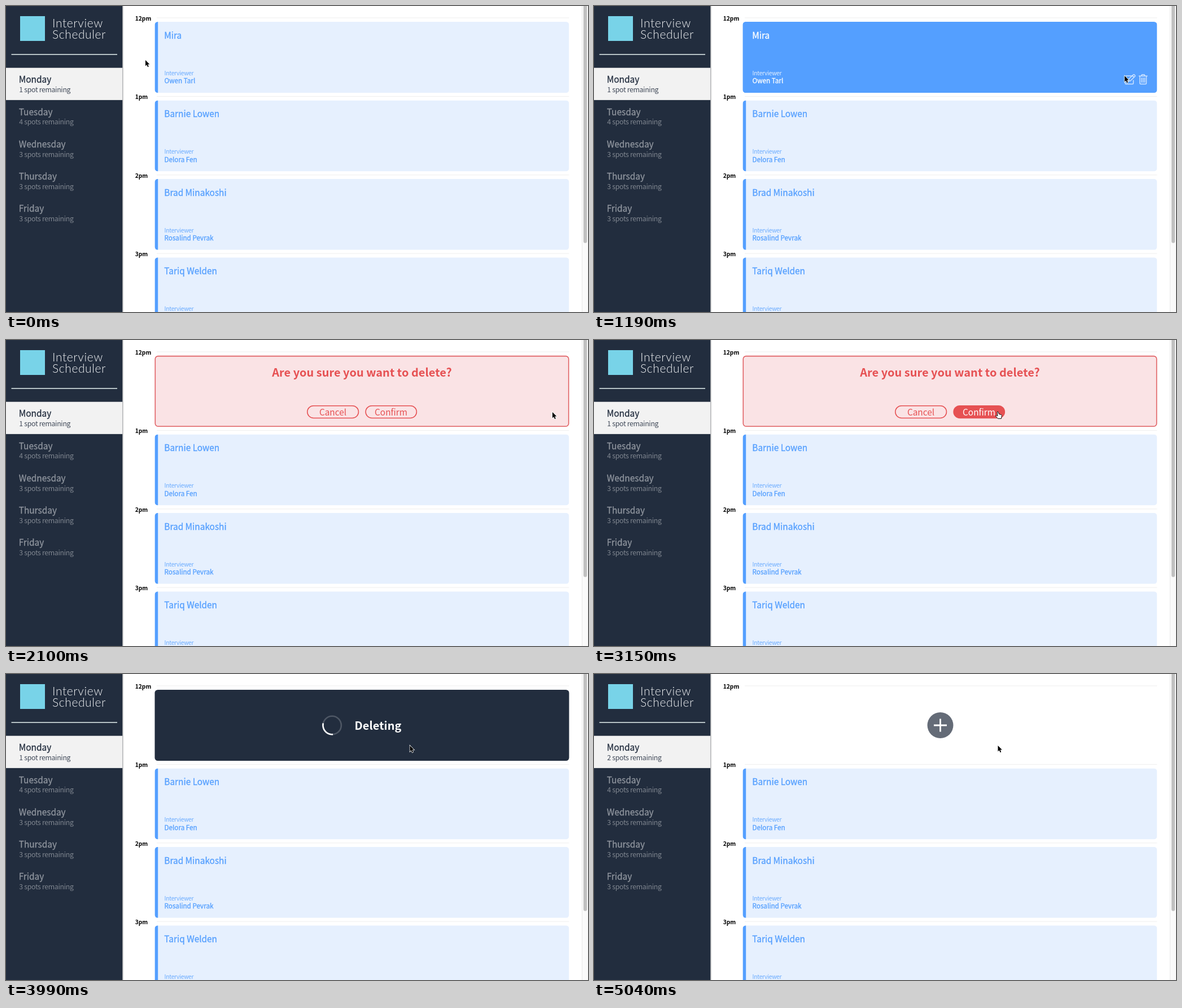
Recreate the animation shown at these times as an HTML page. Size 1031 px wide and 543 px high, loop 5740 ms.

```html
<!DOCTYPE html>
<html lang="en">
<head>
<meta charset="utf-8">
<title>Interview Scheduler</title>
<style>
  html, body { margin: 0; width: 100%; height: 100%; overflow: hidden; background: #fff; }
  svg { display: block; width: 1031px; height: 543px; }
  text { font: 400 15.4px "Noto Sans CJK JP", "Noto Sans CJK SC", "Noto Sans", sans-serif; white-space: pre; }
  .brand { font: 300 21px Lato, "Open Sans", sans-serif; letter-spacing: .6px; fill: #f0f2f4; }
  .spots { font-size: 12.3px; letter-spacing: -.026em; fill-opacity: .85; }
  .label { font-size: 10.26px; letter-spacing: -.026em; fill-opacity: .85; }
  .person { font-size: 11.7px; }
  .name, .person { stroke: currentColor; stroke-width: .3; }
  .hour { font-size: 10.26px; font-weight: 700; }
  .big { font-size: 20px; font-weight: 700; }
  .mid { text-anchor: middle; }
  .icon { fill: none; stroke: #fff; stroke-width: 1.5; stroke-linejoin: round; stroke-linecap: round; }
</style>
</head>
<body>
<svg viewBox="0 0 1031 543">
  <defs>
    <linearGradient id="shade">
      <stop stop-color="#000" stop-opacity=".28"/>
      <stop offset="1" stop-color="#000" stop-opacity="0"/>
    </linearGradient>
    <clipPath id="cardShape"><rect width="734" height="126" rx="5.5"/></clipPath>
  </defs>

  <rect x="206" width="3" height="543" fill="url(#shade)"/>
  <rect width="206.3" height="543" fill="#222d3e"/>
  <rect x="25" y="18" width="44" height="44" fill="#78d3e8"/>
  <text class="brand" x="82" y="37.7">Interview</text>
  <text class="brand" x="82" y="58">Scheduler</text>
  <path d="M9.5 86H197" stroke="#e6f3f2" stroke-width="1.6"/>
  <rect y="109.7" width="206.3" height="57.2" fill="#f2f2f2"/>
  <g id="days"></g>

  <g id="hours"></g>
  <g id="cards"></g>

  <g id="active">
    <g class="icon" opacity=".72">
      <path d="M953 124H942.5Q941 124 941 125.5V137Q941 138.5 942.5 138.5H954Q955.5 138.5 955.5 137V132"/>
      <path d="M946.5 133.5L947 130L955.5 121.8Q956.3 121.2 957 121.8L958.4 123.2Q959 124 958.4 124.7L950 133ZM953.7 123.6L956.5 126.4"/>
    </g>
    <g class="icon" id="trash">
      <path d="M965.5 124.3H980M969.5 124L970.5 121.8H975L976 124M967 124.5V137Q967 138.5 968.5 138.5H977Q978.5 138.5 978.5 137V124.5M970 127.5V135.5M972.8 127.5V135.5M975.6 127.5V135.5"/>
    </g>
  </g>

  <g id="confirm" fill="#e65153">
    <rect x="264.3" y="28.6" width="732.4" height="124.6" rx="5" fill="#fae3e5" stroke="#e06063" stroke-width="1.6"/>
    <text class="big mid" x="630.5" y="64.5">Are you sure you want to delete?</text>
    <g stroke="#e65153" stroke-width="1.5">
      <rect x="533.8" y="116.7" width="90.7" height="21.8" rx="10.9" fill="none"/>
      <rect id="button" x="637.1" y="116.7" width="90.3" height="21.8" rx="10.9"/>
    </g>
    <text class="mid" x="579" y="133.7">Cancel</text>
    <text class="mid" id="buttonText" x="682" y="133.7">Confirm</text>
  </g>

  <g id="deleting">
    <rect x="263.5" y="28" width="734" height="126" rx="5.5" fill="#222d3e"/>
    <g fill="none" stroke="#fff" stroke-width="2.6">
      <circle cx="577.7" cy="91" r="16.2" opacity=".2"/>
      <circle id="spinner" cx="577.7" cy="91" r="16.2" pathLength="100" stroke-dasharray="30 70"/>
    </g>
    <text class="big" x="617.6" y="99" fill="#fff">Deleting</text>
  </g>

  <g id="empty">
    <circle cx="613.5" cy="91" r="23" fill="#646b77"/>
    <path d="M602 91H625M613.5 79.5V102.5" stroke="#fff" stroke-width="2.8"/>
  </g>

  <rect x="1020" width="11" height="543" fill="#fafafa"/>
  <path d="M1020.5 0V543" stroke="#e8e8e8"/>
  <rect x="1023" y="-10" width="6.2" height="430.5" rx="3.1" fill="#c1c1c1"/>

  <g id="cursor">
    <circle id="ring" r="23.5" fill="none" stroke="#000" stroke-opacity=".3" stroke-width="2"/>
    <path id="arrow" d="M0 0V10.6L2.4 8.3L4.1 12.2L5.8 11.4L4.2 7.6H7.4Z" fill="#000" stroke="#fff" stroke-width="1.4" paint-order="stroke"/>
    <path id="hand" d="M-1.5 .8Q-.4 -.6 .6 .8L1.8 4.4L6 5.6Q7 6 6.8 7.5L6 12.5H0L-4 8Q-4 6.4 -2 7L-.5 8Z" fill="#fff" stroke="#111" stroke-width="1"/>
  </g>
</svg>
<script>
const $ = id => document.getElementById(id);
const LOOP = 5740, STEP = 70, BLUE = '#549fff';
const HOUR_GAP = 139.4, DAY_GAP = 57.3;

const days = [['Monday', '1 spot'], ['Tuesday', '4 spots'], ['Wednesday', '3 spots'],
  ['Thursday', '3 spots'], ['Friday', '3 spots']];
$('days').innerHTML = days.map(([day, spots], i) => `
  <g transform="translate(23.3 ${136.2 + i * DAY_GAP})" color="${i ? '#8f959e' : '#222d3e'}" fill="currentColor">
    <text class="name" x="-.6">${day}</text>
    <text class="spots" y="16.8">${spots} remaining</text>
  </g>`).join('');
const mondaySpots = document.querySelector('.spots');

$('hours').innerHTML = ['12pm', '1pm', '2pm', '3pm'].map((hour, i) => `
  <g transform="translate(0 ${i * HOUR_GAP})">
    <path d="M267 21H997.5" stroke="#efefef"/>
    <text class="hour" x="228.7" y="26">${hour}</text>
  </g>`).join('');

const card = (row, name, interviewer, back, ink) => `
  <g transform="translate(263.5 ${28 + row * HOUR_GAP})" color="${ink}" fill="currentColor">
    <g clip-path="url(#cardShape)">
      <rect width="734" height="126" fill="${back}"/>
      <rect width="5.7" height="126" fill="${BLUE}"/>
    </g>
    <text class="name" x="16.8" y="30">${name}</text>
    <text class="label" x="17" y="95">Interviewer</text>
    <text class="person" x="17" y="109.3">${interviewer}</text>
  </g>`;
const bookings = [['Mira', 'Owen Tarl'], ['Barnie Lowen', 'Delora Fen'],
  ['Brad Minakoshi', 'Rosalind Pevrak'], ['Tariq Welden', 'Nadine Ostel']];
$('cards').innerHTML = bookings.map((b, i) => card(i, ...b, '#e6f0fe', BLUE)).join('');
const firstCard = $('cards').firstElementChild;
$('active').insertAdjacentHTML('afterbegin', card(0, ...bookings[0], BLUE, '#fff'));

// Cursor keys: time, x, y
const path = [[0, 247, 96], [280, 247, 96], [490, 315, 96], [840, 760, 108], [1190, 940, 124],
  [1540, 966, 127], [1750, 968, 128], [2170, 968, 128], [2590, 740, 130], [2660, 727, 129],
  [2870, 715.5, 127], [LOOP, 715.5, 127]];
function cursorAt(t) {
  const i = path.findIndex(key => key[0] > t);
  const [t0, x0, y0] = path[i - 1], [t1, x1, y1] = path[i];
  const k = (t - t0) / (t1 - t0);
  return [x0 + (x1 - x0) * k, y0 + (y1 - y0) * k];
}

const show = (el, on) => { el.style.display = on ? '' : 'none'; };
const ramp = (t, start, length) => Math.min(1, Math.max(0, (t - start) / length));

function draw(now) {
  const t = Math.floor(now % LOOP / STEP) * STEP;
  const [x, y] = cursorAt(t);
  const confirming = t >= 2100 && t < 3640;
  const pointing = t >= 1540 && t < 2100 || confirming && x < 728;
  const removed = t >= 4900;

  show(firstCard, t < 2100 && x < 263.5);
  show($('active'), t < 2100 && x >= 263.5);
  show($('confirm'), confirming);
  show($('deleting'), t >= 3640 && !removed);
  show($('empty'), removed);
  mondaySpots.textContent = removed ? '2 spots remaining' : '1 spot remaining';

  $('trash').setAttribute('opacity', .72 + .28 * ramp(t, 1540, 210));
  const fill = ramp(t, 2590, 210);
  $('button').setAttribute('fill-opacity', fill);
  $('buttonText').style.fill = `color-mix(in srgb, #fff ${fill * 100}%, #e65153)`;
  $('spinner').setAttribute('transform', `rotate(${85 + (t - 3990) * .36} 577.7 91)`);

  $('cursor').setAttribute('transform', `translate(${x} ${y})`);
  show($('hand'), pointing);
  show($('arrow'), !pointing);
  show($('ring'), t >= 1960 && t < 2100);
}

const start = performance.now();
function tick() {
  draw(performance.now() - start);
  requestAnimationFrame(tick);
}
tick();
</script>
</body>
</html>
```
